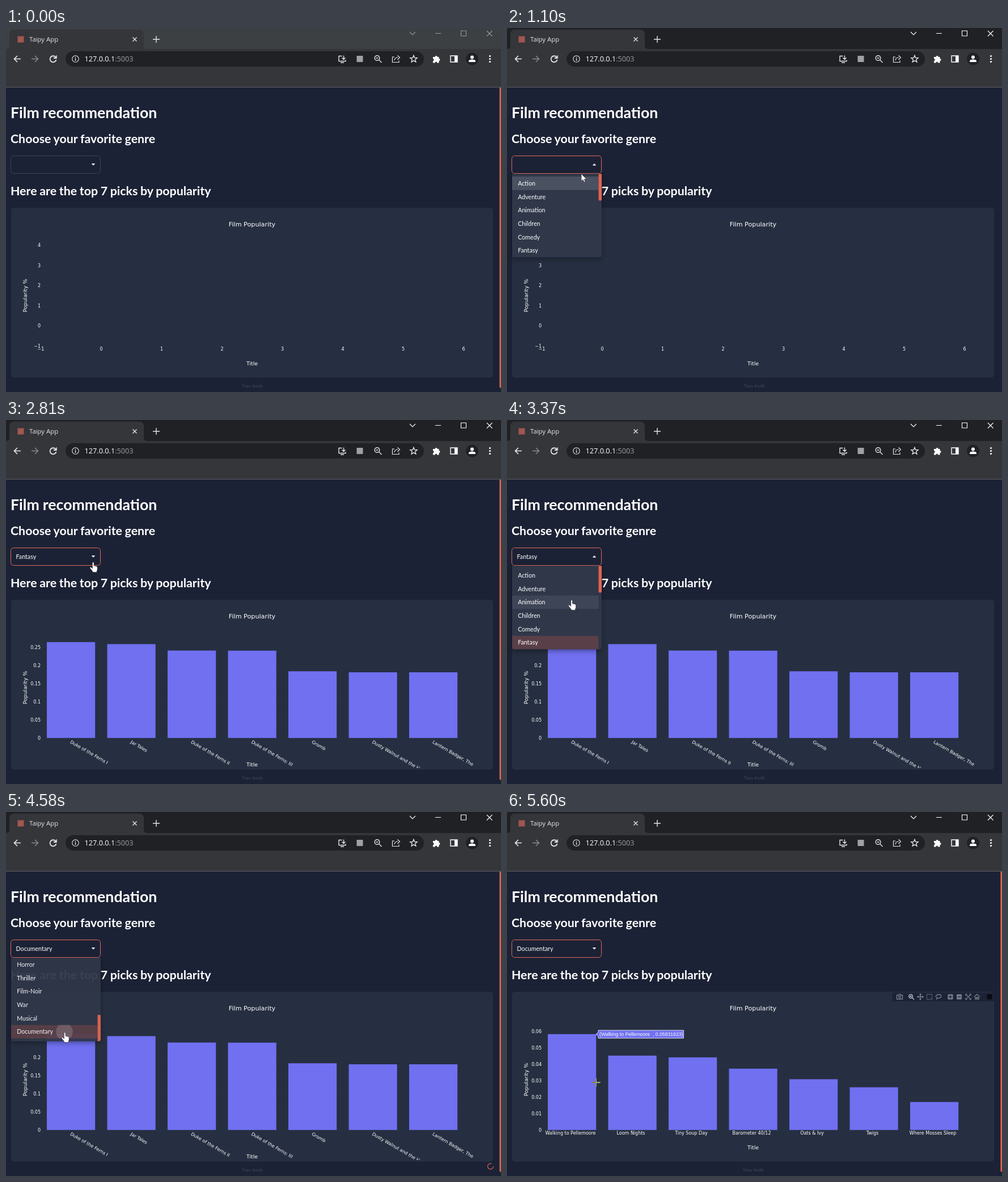
An HTML page that plays this animation: 873x642 px, repeating every 5.67 s.

```html
<!DOCTYPE html>
<html lang="en">
<head>
<meta charset="utf-8">
<title>Film recommendation</title>
<style>
  html, body { margin: 0; width: 100%; height: 100%; overflow: hidden; background: #1c2235; }
  svg { display: block; position: absolute; left: 0; top: 0; }
  text { fill: #fff; white-space: pre; }
  .h1, .h2 { font-family: Lato, sans-serif; font-weight: 700; font-size: 26.67px; word-spacing: -.5px; }
  .h2 { font-size: 21.33px; }
  .item { font: 10.67px Lato, sans-serif; }
  .foot { font: 7.33px Lato, sans-serif; fill: #414859; text-anchor: middle; }
  .ui { font: 11.4px "Open Sans", "Noto Sans", sans-serif; fill: #e4e5e8; }
  .url { font: 12.7px "Open Sans", "Noto Sans", sans-serif; }
  .tick { font: 8px "DejaVu Sans", sans-serif; }
  .axis { font: 9.33px "DejaVu Sans", sans-serif; }
  .title { font: 11.2px "DejaVu Sans", sans-serif; }
  .tip { font: 8.67px "Liberation Sans", Arial, sans-serif; }
  .mid { text-anchor: middle; }
  .end { text-anchor: end; }
  .line { fill: none; stroke: #e4e5e8; stroke-width: 1.4; }
  .thin { stroke-width: 1.1; }
  #cross { mix-blend-mode: difference; }
  #menu { filter: drop-shadow(0 3px 4px rgba(0, 0, 0, .35)); }
</style>
</head>
<body>
<svg id="stage" width="873" height="642" viewBox="0 0 873 642"></svg>
<script>
const LOOP = 5670, PITCH = 106.5, ROW = 23.73, RED = '#e0654f', BAR = '#7070f1';

const genres = ['Action', 'Adventure', 'Animation', 'Children', 'Comedy', 'Fantasy', 'Romance', 'Family',
  'Sci-FI', 'Western', 'Crime', 'Mystery', 'Drama', 'Horror', 'Thriller', 'Film-Noir', 'War', 'Musical',
  'Documentary'];
const fantasy = ['Duke of the Ferns I', 'Jar Tales', 'Duke of the Ferns II', 'Duke of the Ferns: III', 'Gromb',
  'Dusty Walnut and the H', 'Lantern Badger, The'];
const docs = ['Walking to Pellemoore', 'Loom Nights', 'Tiny Soup Day', 'Barometer 40/12', 'Oats &amp; Ivy',
  'Twigs', 'Where Mosses Sleep'];

const text = (x, y, s, cls, more = '') => `<text x="${x}" y="${y}" class="${cls}" ${more}>${s}</text>`;
const rect = (x, y, w, h, fill, more = '') =>
  `<rect x="${x}" y="${y}" width="${w}" height="${h}" fill="${fill}" ${more}/>`;
const path = (d, more = '') => `<path d="${d}" class="line" ${more}/>`;
const at = (x, y, s) => `<g transform="translate(${x} ${y})">${s}</g>`;

function browser() {
  return rect(0, 0, 873, 38, '#3c4043', 'id="strip"') +
    `<path d="M0 37Q6 37 6 31V11Q6 3 14 3H235Q243 3 243 11V31Q243 37 249 37V38H0z" fill="#35363a"/>` +
    rect(0, 37, 873, 67, '#35363a') + rect(0, 104, 873, 1, '#5b5d63') +
    rect(20.5, 14.5, 11, 11, '#a2564f') + text(41, 24, 'Taipy App', 'ui') +
    path('M223.5 16.5l7 7m0-7l-7 7M259 20h12M265 14v12', 'stroke-width="1.6"') +
    `<g id="winbtn">${path('M712 7l5 5 5-5M757 9.5h10M802.500 5h9v9h-9zM848 5l9.500 9.500m0-9.500l-9.500 9.500', 'style="stroke:inherit;stroke-width:1.1"')}</g>` +
    rect(105, 41, 632, 27, '#202124', 'rx="13.500"') +
    // navigation
    at(20, 54.5, path('M6 0H-5M0-5.500L-5.500 0 0 5.500', 'style="stroke-width:1.7"')) +
    at(51, 54.5, path('M-6 0H5M0-5.500L5.500 0 0 5.500', 'style="stroke:#898b90"')) +
    at(83, 54.5, path('M4.600-3A5.500 5.500 0 1 0 5.500 1.500M5.800-6V-1.500H1', 'style="stroke-width:1.8"')) +
    at(122.5, 54.5, `<circle r="5.700" class="line thin"/>` + path('M0-1V3.500M0-3.500V-2')) +
    text(138.5, 59.3, '127.0.0.1<tspan fill="#9a9da3">:5003</tspan>', 'url') +
    // page actions
    at(593, 55, path('M2.500-6.500V.5M-.5-2.500L2.500.5 5.500-2.500M-.5-5.500H-6V3.500H6V1.500M-3 6H3')) +
    rect(618.5, 49, 11, 11, '#9da0a5') +
    at(656, 54.5, `<circle cx="-1.500" cy="-1.500" r="4.300" class="line"/>` + path('M1.700 1.700L6.500 6.500M-3.500-1.500h4')) +
    at(688, 54.5, path('M-3-3.500H-6.500V6H5V3M-3 2.500Q-2.500-2.500 3-2.500M2.500-6L6.500-2.500 2.500 1.500', 'style="stroke-width:1.2"')) +
    at(719, 54.5, path('M0-6.300L1.700-2 6.200-1.800 2.700 1.200 3.900 5.600 0 3.100-3.900 5.600-2.700 1.200-6.200-1.800-1.700-2z', 'style="stroke-width:1.3"')) +
    at(759, 55, `<path d="M-6-4H-2.300A2 2 0 1 1 1.700-4H4.500V-1A2 2 0 1 1 4.500 3V6.500H1.300A1.900 1.900 0 0 0-2.500 6.500H-6V3A1.900 1.900 0 0 0-6-.8z" fill="#fff"/>`) +
    at(790, 54.5, path('M-6-5.500H6V5.500H-6z', 'style="stroke:#fff"') + rect(1, -5.5, 5, 11, '#fff')) +
    at(822, 54.5, `<circle r="11" fill="#202124"/><circle cy="-3" r="3" fill="#fff"/><path d="M-6 5.500V4Q-6 1 0 1T6 4V5.500z" fill="#fff"/>`) +
    at(853.5, 54.5, [-5, 0, 5].map(y => `<circle cy="${y}" r="1.600" fill="#fff"/>`).join(''));
}

function chart(id, ticks, tickY, bars, titleY) {
  let s = '';
  ticks.forEach((v, i) => {
    const y = tickY(i);
    s += rect(61, y, 745, .7, '#2a3444') + text(61, y + 3, v, 'tick end');
  });
  bars.forEach((top, i) => s += rect(72 + PITCH * i, top, 85.2, 560.8 - top, BAR));
  return `<g id="${id}">${s}${text(434, titleY, 'Title', 'axis mid')}`;
}

const charts =
  chart('c0', ['−1', 0, 1, 2, 3, 4], i => 561 - 35.6 * i, [], 595) +
  [-1, 0, 1, 2, 3, 4, 5, 6].map((v, i) => text(61.5 + PITCH * i, 569, v < 0 ? '−1' : v, 'tick mid')).join('') + '</g>' +
  chart('c1', [0, .05, .1, .15, .2, .25], i => 561 - 32.1 * i, [391.7, 395.3, 406.6, 406.8, 443.2, 445, 445], 611) +
  `<g clip-path="url(#labels)">` + fantasy.map((s, i) =>
    at(112.5 + PITCH * i, 569.5, text(0, 0, s, 'tick', 'transform="rotate(30)"'))).join('') + '</g></g>' +
  chart('c2', [0, .01, .02, .03, .04, .05, .06], i => 561 - 29 * i, [391.8, 429.7, 432.8, 452.7, 471.3, 485.5, 511.5], 595) +
  docs.map((s, i) => text(112 + PITCH * i, 569.3, s, 'tick mid')).join('') + '</g>';

function modebar() {
  const icons = [
    [692.5, 'M-5-3H-2L-1-4.500H1L2-3H5V4H-5zM0-1.500A1.800 1.800 0 1 0 .1-1.500'],
    [713, 'M1.800 1.800L5 5M-1-4.300A3.300 3.300 0 1 0-.9-4.300M-2.500-1h3M-1-2.500v3'],
    [729, 'M-5 0H5M0-5V5M-3.500-1.500L-5 0-3.500 1.500M3.500-1.500L5 0 3.500 1.500M-1.500-3.500L0-5 1.500-3.500M-1.500 3.500L0 5 1.500 3.500'],
    [745, 'M-4.500-4.500H4.500V4.500H-4.500z'],
    [761, 'M-2 2.500C-8-1-2-5 2-4S6 2-1 2.500Q-4 2-3 5'],
    [813.5, 'M-4.500-2V-4.500H-2M2-4.500H4.500V-2M4.500 2V4.500H2M-2 4.500H-4.500V2M-3-3L3 3M3-3L-3 3'],
    [829, 'M-5 0L0-4.500 5 0M-3 0V4H-1V1H1V4H3V0']
  ];
  const box = (x, d) => at(x, 326, rect(-4.5, -4.5, 9, 9, '#7a8090', 'rx="1"') + path(d, 'style="stroke:#1c2336"'));
  return rect(679.5, 318.5, 179.5, 15.5, '#1c2336') + icons.map(([x, d], i) =>
    at(x, 326, path(d, `style="stroke:${i == 1 ? '#c3c6cd' : '#7a8090'};stroke-width:1.3"` +
      (i == 3 ? ' stroke-dasharray="1.500 1.500"' : '')))).join('') +
    box(782, 'M-3 0H3M0-3V3') + box(797.5, 'M-3 0H3') + rect(846.5, 321.5, 9, 9, '#080b12');
}

document.getElementById('stage').innerHTML = `
  <defs>
    <clipPath id="labels"><rect y="317" width="873" height="296.500"/></clipPath>
    <clipPath id="list"><path d="M9 257H167V400.500Q167 404.500 163 404.500H13Q9 404.500 9 400.500z"/></clipPath>
    <clipPath id="rowclip"><rect id="rowbox" x="9" width="152.500" height="${ROW}"/></clipPath>
  </defs>
  ${rect(0, 0, 873, 642, '#1c2235')}
  ${browser()}
  ${text(8, 158.8, 'Film recommendation', 'h1')}
  ${text(8, 203, 'Choose your favorite genre', 'h2')}
  ${text(8, 294.6, 'Here are the top 7 picks by popularity', 'h2')}
  ${rect(8.5, 225.5, 158, 31, 'none', 'id="select" rx="5"')}
  ${text(17.6, 244.7, '', 'item', 'id="value"')}
  <path id="caret" d="M-3.300-1.700H3.300L0 1.700z" fill="#fff"/>
  ${rect(9, 318, 850, 300, '#161c2c', 'rx="5"')}
  ${rect(9, 317, 850, 300, '#262f41', 'rx="5"')}
  ${text(434, 349.6, 'Film Popularity', 'title mid')}
  ${at(36.5, 472, text(0, 0, 'Popularity %', 'axis mid', 'transform="rotate(-90)"'))}
  ${charts}
  <g id="modebar">${modebar()}</g>
  <g id="tip">
    <path d="M157 392L161 388V385H311.500V399H161V396z" fill="${BAR}" stroke="#fff" stroke-width=".8"/>
    ${text(163, 395, '(' + docs[0] + '\u00a0 , 0.05831923)', 'tip')}
  </g>
  ${text(0, 634, 'Taipy Inside', 'foot', 'id="foot"')}
  ${rect(870.4, 105, 4, 529.5, RED, 'id="scrollbar" rx="1.500"')}
  <path id="spinner" d="M2-4.600A5 5 0 1 0 5 0" fill="none" stroke="#c95b4e" stroke-width="1.300"/>
  <g id="menu"><g clip-path="url(#list)">
    ${rect(9, 257, 158, 148, '#2f3749')}
    ${rect(9, 0, 152.5, ROW, '#fff', 'id="hover"')}
    ${rect(9, 0, 152.5, ROW, '#fff', 'id="picked"')}
    <g clip-path="url(#rowclip)"><circle id="ripple" fill="#fff" fill-opacity=".17"/></g>
    <g id="items">${genres.map((s, i) => text(19.2, 277.8 + ROW * i, s, 'item')).join('')}</g>
    ${rect(161.5, 0, 5.5, 47, RED, 'id="thumb" rx="1.500"')}
  </g></g>
  <g id="arrow"><path d="M0 0V13l3-2.800 2 4.600 2.200-1-2-4.400h4.200z" fill="#fff" stroke="#111" stroke-width=".6"/></g>
  <g id="hand"><path d="M-1.700 1.200a1.400 1.400 0 0 1 2.800 0V6l4.300 1q1.800.5 1.800 2.300v3.200q0 1.600-1 2.800V17.500h-7.500v-1.600L-5.600 10.600q-.9-1.400.2-2 1-.5 2 .6L-1.700 10.800z" fill="#fff" stroke="#151a28" stroke-width=".6"/></g>
  <g id="cross"><path d="M-7.500 0H7.500M0-7.500V7.500" stroke="#fff" stroke-width="1.400"/></g>`;

const el = {};
document.querySelectorAll('[id]').forEach(e => el[e.id] = e);
const set = (id, o) => { for (const k in o) el[id].setAttribute(k, o[k]); };
const show = (id, on) => { el[id].style.display = on ? '' : 'none'; };
const smooth = p => (p = Math.min(1, Math.max(0, p)), p * p * (3 - 2 * p));
const within = (t, a, b) => t >= a && t < b;

// Linear interpolation through [time, ...values] keys
function track(keys, t) {
  if (t <= keys[0][0]) return keys[0].slice(1);
  for (let i = 1; i < keys.length; i++) {
    const [a, b] = [keys[i - 1], keys[i]];
    if (t < b[0]) return b.slice(1).map((v, k) => a[k + 1] + (v - a[k + 1]) * (t - a[0]) / (b[0] - a[0]));
  }
  return keys[keys.length - 1].slice(1);
}
const step = (keys, t) => keys.filter(k => k[0] <= t).pop()[1];

const pointer = [[70, 330, 264], [330, 200, 250], [540, 138, 244], [900, 133, 248], [1100, 131, 257],
  [1230, 127, 288], [1500, 105, 345], [1800, 85, 393], [2220, 85, 393], [2420, 96, 362], [2600, 130, 300],
  [2790, 154, 251], [3080, 154, 251], [3300, 124, 300], [3440, 105, 335], [4080, 105, 335], [4400, 104, 389],
  [4870, 104, 389], [5140, 114, 420], [5460, 132, 454], [5590, 157, 477]];
const shapes = [[0, ''], [70, 'arrow'], [430, 'hand'], [640, 'arrow'], [1170, 'hand'], [2260, 'cross'],
  [2420, 'arrow'], [2760, 'hand'], [2900, 'arrow'], [3230, 'hand'], [4900, 'cross']];
const scrolling = [[3480, 0], [3640, 100], [3710, 104], [3850, 196.8], [3900, 203], [4050, 313.5]];
const menus = [
  { open: 640, press: 1870, close: 1915, before: 0, pick: 5 },
  { open: 2890, press: 4515, close: 4545, before: 5, pick: 18 }
];

function drawMenu(t, x, y, shape) {
  const m = menus.find(m => within(t, m.open, m.close + 220));
  show('menu', m);
  if (!m) return;
  const closing = t >= m.close;
  const grow = closing ? 1 - smooth((t - m.close - 90) / 146) : smooth((t - m.open) / 200);
  el.menu.style.opacity = closing ? 1 - smooth((t - m.close) / 261) : smooth((t - m.open) / 240);
  set('menu', { transform: `translate(88 257) scale(${.75 + .25 * grow} ${.5625 + .4375 * grow}) translate(-88 -257)` });

  const scroll = track(scrolling, t)[0];
  const rowY = i => 262 + ROW * i - scroll;
  set('items', { transform: `translate(0 ${-scroll})` });
  set('thumb', { y: 257.3 + scroll / 313.5 * 100.5 });

  const picked = closing ? m.pick : m.before;
  set('picked', { y: rowY(picked), fill: picked ? '#ff6049' : '#fff', 'fill-opacity': picked ? .2 : .13 });
  const over = Math.floor((y - 262 + scroll) / ROW);
  show('hover', shape == 'hand' && over != picked && !within(t, 3480, 4080));
  set('hover', { y: rowY(over), 'fill-opacity': .07 });
  set('rowbox', { y: rowY(m.pick) });
  set('ripple', { cx: x - 1, cy: rowY(m.pick) + ROW / 2, r: Math.max(0, t - m.press) * .224 });
}

function draw(t) {
  const [x, y] = track(pointer, t), shape = step(shapes, t);
  const open = menus.some(m => within(t, m.open, m.close));
  const locked = within(t, 610, 1925) || within(t, 2890, 4555);
  const focused = t >= 600, active = t >= 680;

  set('strip', { fill: focused ? '#202124' : '#3c4043' });
  set('winbtn', { stroke: focused ? '#fff' : '#94979b' });
  set('select', { stroke: active ? '#e0685a' : '#3c4459', 'stroke-width': 1 });
  set('caret', { transform: `translate(154 240.8) scale(1 ${open ? -1 : 1})` });
  el.value.textContent = step([[0, ''], [1915, 'Fantasy'], [4545, 'Documentary']], t);
  set('foot', { x: locked ? 436.5 : 434.5 });
  show('scrollbar', !locked);
  show('spinner', within(t, 1930, 2130) || within(t, 4550, 4720));
  set('spinner', { transform: `translate(854.500 625) rotate(${(t - 2000) / 1290 * 360})` });

  const current = step([[0, 0], [2130, 1], [4720, 2]], t);
  [0, 1, 2].forEach(i => show('c' + i, i == current));
  show('modebar', within(t, 2270, 2560) || t >= 4910);
  show('tip', t >= 4980);
  drawMenu(t, x, y, shape);
  ['arrow', 'hand', 'cross'].forEach(id => {
    show(id, id == shape);
    set(id, { transform: `translate(${x} ${y})` });
  });
}

const start = performance.now();
function tick() {
  draw((performance.now() - start) % LOOP);
  requestAnimationFrame(tick);
}
tick();
</script>
</body>
</html>
```
